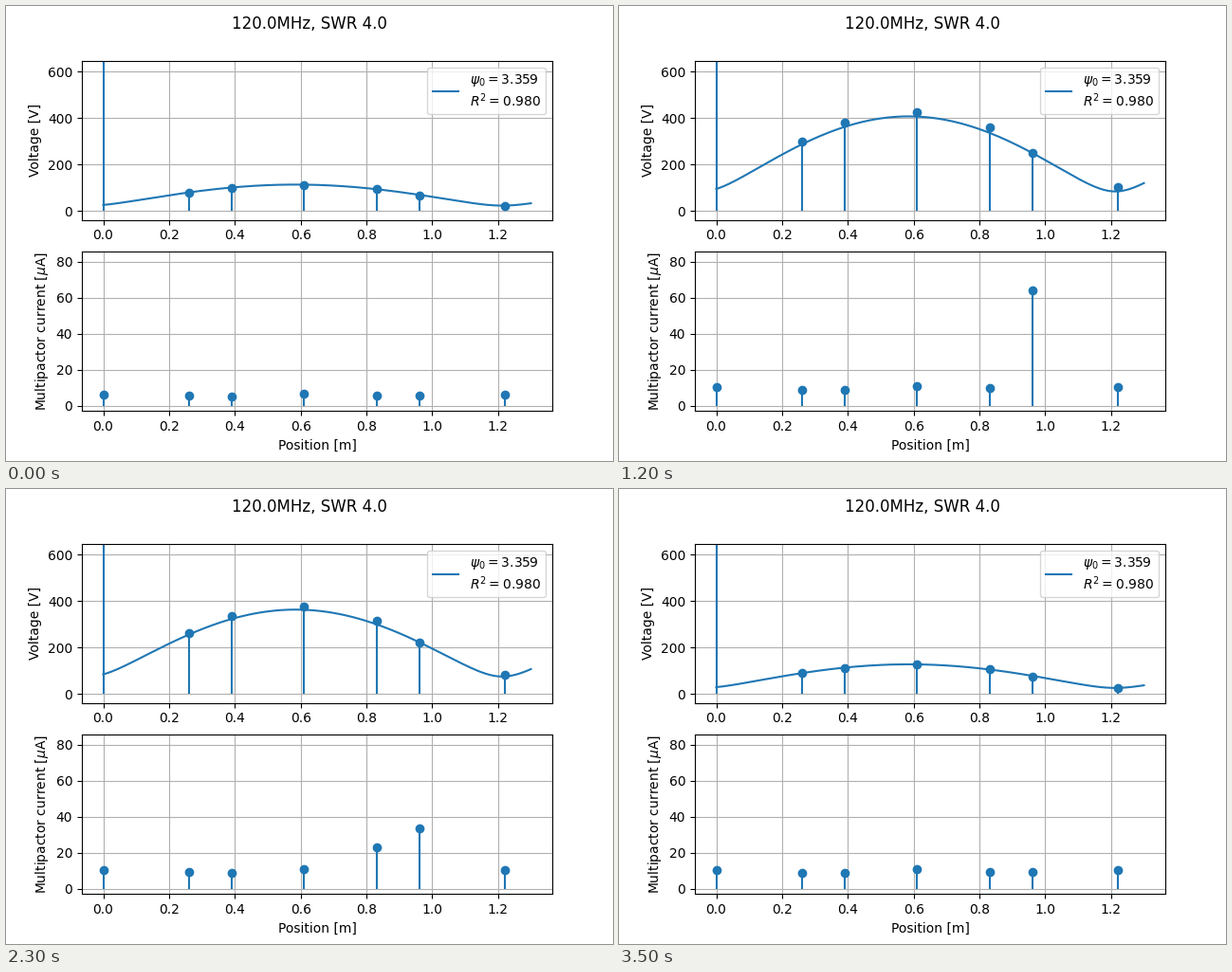
A matplotlib script that plays this animation: 640 by 480 pixels, repeating every 3570 ms.

```python
import numpy as np
import matplotlib.pyplot as plt
from matplotlib.animation import FuncAnimation

INTERVAL, FRAMES, HOLD = 30, 119, 100  # ms per tick, ticks per loop, ms per sample

# Wave amplitude over the power cycle: a few keys joined by a smooth curve
STEPS = np.array([0, 8, 12, 16.5, 18, 23, 27, 30, 35])
AMPS = np.array([114, 270, 407, 550, 531, 363, 239, 170, 128])
SLOPES = np.gradient(AMPS, STEPS)

PSI, TWO_BETA, DEPTH = 3.359, 5.0, 0.4784
FULL = 531
OFF_SCALE = 1000

# Probes read slightly above the fit, more so at high power
PROBES = np.array([0, 0.26, 0.39, 0.61, 0.832, 0.96, 1.22])
RISE = np.array([0, 0.09, 0.11, 0.1, 0.13, 0.1, 0.65])
POWER = np.array([1, 1, 1, 1, 1, 4, 4])

# Multipactor bursts: bell curves over the local voltage (height, centre, width)
IDLE = np.array([10.1, 9, 8.7, 10.7, 9.5, 9.1, 10.3])
BELLS = {1: (8.7, 205, 28), 2: (15.5, 210, 30), 3: (10.8, 225, 25), 4: (63, 262, 44)}
LATCH = 5  # this probe stays on above its threshold


def amplitude(n):
    """Cubic Hermite curve through the amplitude keys."""
    k = min(np.searchsorted(STEPS, n, side="right") - 1, len(STEPS) - 2)
    h = STEPS[k + 1] - STEPS[k]
    u = (n - STEPS[k]) / h
    ease = u * u * (3 - 2 * u)
    return (AMPS[k] + (AMPS[k + 1] - AMPS[k]) * ease
            + h * u * (1 - u) * (SLOPES[k] * (1 - u) - SLOPES[k + 1] * u))


def wave(x):
    return np.sqrt(1 - DEPTH * (1 - np.cos(TWO_BETA * x + PSI)))


def voltages(amp):
    volts = amp * wave(PROBES) * (0.97 + RISE * (amp / FULL) ** POWER)
    volts[0] = OFF_SCALE
    return volts


def currents(n, volts):
    out = IDLE * (1 - 0.4 * np.exp(-n / 1.2))
    for i, (height, centre, width) in BELLS.items():
        out[i] += height * np.exp(-((volts[i] - centre) / width) ** 2)
    out[LATCH] += 62 / (1 + np.exp((226.6 - volts[LATCH]) / 12))
    return out


def make_stem(ax):
    return ax.stem(PROBES, np.ones(len(PROBES)), linefmt="C0-",
                   markerfmt="C0o", basefmt=" ")


def set_stem(stem, y):
    stem.markerline.set_ydata(y)
    stem.stemlines.set_segments([[(p, 0), (p, v)] for p, v in zip(PROBES, y)])


fig, (ax_v, ax_i) = plt.subplots(2, 1, figsize=(6.4, 4.8), dpi=100)
fig.suptitle("120.0MHz, SWR 4.0")

x = np.linspace(0, 1.3, 200)
shape = wave(x)
volt_stem = make_stem(ax_v)
curve, = ax_v.plot(x, shape, "C0",
                   label="$\\psi_0 = 3.359$\n$R^2 = 0.980$")
curr_stem = make_stem(ax_i)

ax_v.set_ylabel("Voltage [V]")
ax_v.set_ylim(-37.5, 646.5)
ax_v.legend(loc="upper right")
ax_i.set_xlabel("Position [m]")
ax_i.set_ylabel(r"Multipactor current [$\mu$A]")
ax_i.set_ylim(-2.95, 85.5)
for ax in (ax_v, ax_i):
    ax.set_xlim(-0.065, 1.365)
    ax.grid(True)


def update(frame):
    n = (frame * INTERVAL + INTERVAL - 1) // HOLD
    amp = amplitude(n)
    volts = voltages(amp)
    curve.set_ydata(amp * shape)
    set_stem(volt_stem, volts)
    set_stem(curr_stem, currents(n, volts))
    return curve, volt_stem.markerline, curr_stem.markerline


anim = FuncAnimation(fig, update, frames=FRAMES, interval=INTERVAL,
                     repeat=True, repeat_delay=0, blit=False)
plt.show()
```
